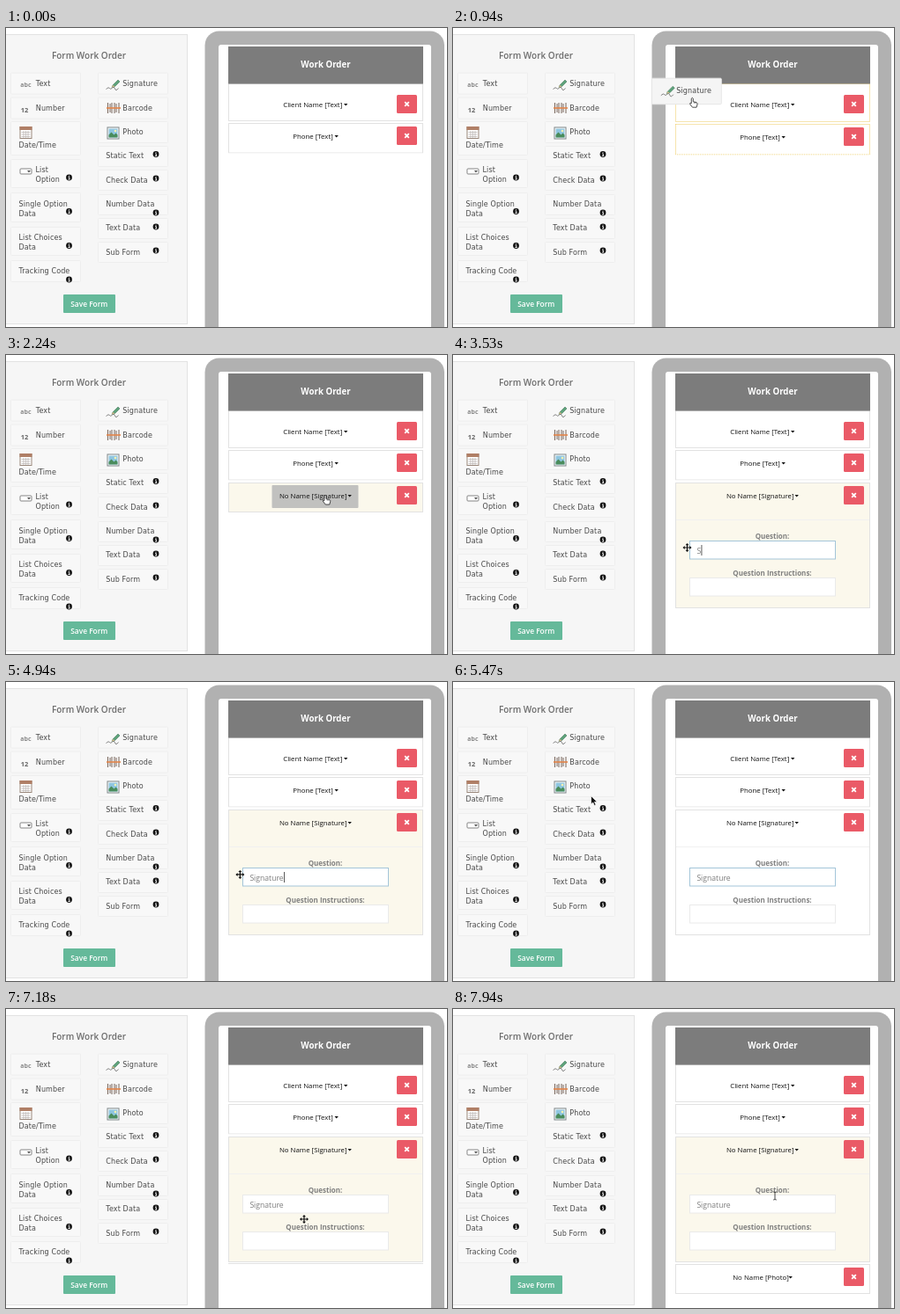
Recreate the animation shown at these times as an HTML page. Size 500 by 340 pixels, loop 8 s.

```html
<!DOCTYPE html>
<html lang="en">
<head>
<meta charset="utf-8">
<title>Form builder</title>
<style>
html, body { margin: 0; width: 100%; height: 100%; overflow: hidden; background: #fff; }
svg { display: block; }
text { font-family: "Open Sans", sans-serif; font-size: 7.85px; white-space: pre; }
.item { font-family: "DejaVu Sans", sans-serif; font-size: 8px; letter-spacing: .12px; fill: #484848; }
.box { fill: #f8f8f8; stroke: #eee; }
.label { font-weight: 700; font-size: 8px; fill: #808080; }
.value { font-size: 8.65px; fill: #7c7c7c; }
.mid { text-anchor: middle; }
.head { font-weight: 700; font-size: 9.7px; fill: #fff; }
</style>
</head>
<body>
<svg id="stage" width="500" height="340" viewBox="0 0 500 340"></svg>
<script>
const LOOP = 8000;
const stage = document.getElementById('stage');
const $ = id => document.getElementById(id);
const set = (id, attrs) => {
  for (const k in attrs) $(id).setAttribute(k, attrs[k]);
};
const show = (id, on) => set(id, { visibility: on ? 'visible' : 'hidden' });

const text = (x, y, s, cls = '', more = '') =>
  `<text x="${x}" y="${y}" class="${cls}" ${more}>${s}</text>`;
const rect = (x, y, w, h, fill, more = '') =>
  `<rect x="${x}" y="${y}" width="${w}" height="${h}" fill="${fill}" ${more}/>`;
const path = (d, fill = 'none', more = '') => `<path d="${d}" fill="${fill}" ${more}/>`;
const use = (id, x, y) => `<use href="#${id}" x="${x}" y="${y}"/>`;

const icons = {
  abc: text(0, 9, 'abc', '', 'font-weight="700" style="font-size:7px" fill="#8b8b8b"'),
  num: text(1, 9, '12', '', 'font-weight="700" style="font-size:7.5px" fill="#666"'),
  date: rect(.5, .5, 13, 13, '#fff', 'stroke="#99877b"') + rect(0, 0, 14, 4, '#b07f66') +
    path('M2 6.5H12M2 9H12M2 11.5H12M4.5 5V13M7 5V13M9.5 5V13', 'none', 'stroke="#b9b4b0" stroke-width=".7"'),
  list: rect(.5, .5, 13, 6, '#fff', 'rx="1" stroke="#858585"') + path('M8.5 2.5h4l-2 2.5z', '#555'),
  sign: path('M0 12.5q3-3 4-1t3-.5 3 1 4-.5', 'none', 'stroke="#666" stroke-width=".8"') +
    path('M7.5 8L13.5 2l2 2L10 9.5l-3.5 1z', '#5da37a', 'stroke="#3d6b53" stroke-width=".5"') +
    path('M7.5 8l2.5 1.5-3.5 1z', '#d9b98a'),
  bars: path('M1.5 0V12M4 1V11M6 0V12M9 0V12M11 1V11M14 0V12', 'none', 'stroke="#77655a" stroke-width="1"') +
    path('M0 6H16', 'none', 'stroke="#e58549" stroke-width="1.6"'),
  photo: rect(.5, .5, 13, 13, '#fff', 'stroke="#7d8588"') + rect(2, 2, 10, 10, '#8fc6e0') +
    path('M2 12V9l3-3 3 3 2-2 2 2v3z', '#4a8c5c') + '<circle cx="9.5" cy="4.5" r="1.3" fill="#fff3b0"/>',
  info: '<circle r="3.4" fill="#111"/>' + path('M-.9-.5H.3V2M-1.1 2H1.2M0-2.3V-1.3', 'none', 'stroke="#fff" stroke-width=".9"')
};

const pointers = {
  arrow: path('M0 0V9.5L2.2 7.5 3.8 11 5.5 10.2 4 6.9H7z', '#111', 'stroke="#fff" stroke-width=".7"'),
  hand: path('M-1 1Q0-.8 1 1V4.6L4.8 5.4Q6.1 6 5.7 7.8L4.8 11H.2L-2.8 7Q-2.8 5.5-1 6.5z', '#fff', 'stroke="#222" stroke-width=".8"') +
    path('M2.2 5V6.6M4 5.4V6.8', 'none', 'stroke="#222" stroke-width=".6"'),
  move: path('M-3.5 0H3.5M0-3.5V3.5', 'none', 'stroke="#111" stroke-width="1.2"') +
    path('M0-5l2 2.2h-4zM0 5l2-2.2h-4zM-5 0l2.2-2v4zM5 0l-2.2-2v4z', '#111'),
  beam: path('M-1.8-4.5Q0-4.5 0-3.5Q0-4.5 1.8-4.5M0-3.5V3.5M-1.8 4.5Q0 4.5 0 3.5Q0 4.5 1.8 4.5', 'none', 'stroke="#333" stroke-width=".9"')
};

// Palette entries: x, y, height, icon, icon offset, text offset, lines, info mark offset
const palette = [
  [5.5, 51, 24, 'abc', [10.8, 7], [28.3, 15], ['Text']],
  [5.5, 79, 24, 'num', [10.3, 8], [28.3, 14.5], ['Number']],
  [5.5, 106.5, 38, 'date', [10, 5.5], [9, 29.8], ['Date/Time']],
  [5.5, 149.5, 32, 'list', [10, 10], [28, 14], ['List', 'Option'], [66, 20.5]],
  [5.5, 187.5, 33, '', 0, [9, 15], ['Single Option', 'Data'], [66, 21]],
  [5.5, 226.5, 32, '', 0, [9, 14.8], ['List Choices', 'Data'], [66, 21]],
  [5.5, 264.5, 24, '', 0, [9, 14.8], ['Tracking Code'], [66, 21.5]],
  [104.5, 51, 24, 'sign', [9, 6], [27.8, 15], ['Signature']],
  [104.5, 79, 24, 'bars', [9.5, 6], [27.8, 14.5], ['Barcode']],
  [104.5, 106.5, 24, 'photo', [10, 6], [27.8, 14.5], ['Photo']],
  [104.5, 134.5, 23, '', 0, [8.8, 13.8], ['Static Text'], [65.5, 9]],
  [104.5, 161.5, 23, '', 0, [8.8, 14], ['Check Data'], [65.5, 9.5]],
  [104.5, 189.5, 23, '', 0, [8.8, 13.8], ['Number Data'], [65.5, 20.5]],
  [104.5, 216.5, 23, '', 0, [8.8, 13.8], ['Text Data'], [65.5, 9.5]],
  [104.5, 243.5, 23, '', 0, [8.8, 14], ['Sub Form'], [65.5, 9.5]]
].map(([x, y, h, icon, at, tx, lines, mark]) =>
  `<g transform="translate(${x} ${y})"><rect width="79" height="${h}" rx="1" class="box"/>` +
  (icon ? use(icon, ...at) : '') +
  lines.map((s, i) => text(tx[0], tx[1] + i * 11, s, 'item')).join('') +
  (mark ? use('info', ...mark) : '') + '</g>').join('');

// Form rows: top, height, content centre, label, label x, caret x
const rows = [
  [63, 43, 24, 'Client Name [Text]', 62.2, 131],
  [108, 34.5, 15, 'Phone [Text]', 73.2, 120.5],
  [145, 34, 15, 'No Name [Signature]', 57.9, 135.5],
  [290, 34, 15, 'No Name [Photo]', 65.2, 128.5]
];

const input = (id, y) => rect(16.5, y, 165, 20.5, '#fff', `id="${id}" stroke="#eaeaea"`);
const details = '<g id="details">' +
  path('M1 42.5H220', 'none', 'stroke="#f1f1f1"') +
  text(110, 63.8, 'Question:', 'label mid') + input('ask', 66.5) +
  rect(24, 70.5, 50, 12, '#b4d5fb', 'id="pick"') +
  text(24.4, 80.5, '', 'value', 'id="value"') +
  rect(0, 71, .8, 12, '#333', 'id="caret"') +
  text(110, 105.5, 'Question Instructions:', 'label mid') + input('notes', 108.5) + '</g>';

const rowMarkup = ([y, h, c, label, x, end], i) =>
  `<svg id="row${i}" x="252" y="${y}" width="221" height="${h}">` +
  rect(.5, .5, 220, h - 1, '#fff', `id="frame${i}"`) + `<g id="body${i}">` +
  (i === 2 ? rect(49.5, 3, 98, 26, '#c1c1bf', 'id="hot" rx="1"') : '') +
  text(x, c + 2.7, label, '', 'fill="#111"') +
  path(`M${end} ${c - .9}h4.4l-2.2 2.4z`, '#111') +
  rect(191, c - 11, 23, 21, '#ea5a67', 'rx="1.5"') +
  path(`M200.2 ${c - 2.8}l4.6 4.6m0-4.6l-4.6 4.6`, 'none', 'stroke="#fff" stroke-width="1.9"') +
  (i === 2 ? details : '') + '</g></svg>';

const group = set => Object.entries(set).map(([id, s]) => `<g id="${id}">${s}</g>`).join('');

stage.innerHTML = `<defs>${group(icons)}</defs>` +
  rect(0, 0, 500, 340, '#fff') +
  rect(-1.5, 7.5, 207, 329, '#f6f6f6', 'stroke="#e2e2e2"') +
  text(94, 34.5, 'Form Work Order', 'mid', 'fill="#6c6c6c" font-weight="600" style="font-size:10px"') +
  palette +
  rect(65, 303, 59, 21, '#65b99a', 'rx="1"') +
  text(94.3, 316.5, 'Save Form', 'mid', 'fill="#fff" font-weight="600" style="font-size:8.4px"') +
  rect(225.5, 3.5, 271.5, 380, '#b1b1b1', 'rx="16"') +
  rect(241, 19, 241, 380, '#fff', 'rx="3"') +
  rows.map(rowMarkup).join('') +
  rect(252, 21, 221, 42.5, '#7c7c7c') +
  text(362.5, 45.3, 'Work Order', 'head mid') +
  '<g id="ghost"><rect id="card" height="29.5" rx="1" fill="#f5f5f5" stroke="#e6e6e6"/>' +
  '<use id="cardIcon" x="10.5" y="7"/>' + text(28, 16.5, '', 'item', 'id="cardText"') + '</g>' +
  '<g id="pointer">' + group(pointers) + '</g>';

// Pointer route: time, x, y, shape from here on, 1 for an even pace to the next point
const route = [
  [0, 185, 246, ''],
  [240, 185, 246, 'arrow'],
  [460, 150, 74, 'hand'],
  [560, 150.5, 74, 'hand', 1],
  [1000, 290, 80, 'hand', 1],
  [1060, 298, 82, 'hand'],
  [1290, 312, 132, 'hand'],
  [1530, 312, 132, 'move'],
  [1640, 307, 115, 'move'],
  [1740, 307, 115, 'move', 1],
  [2090, 346, 148, 'hand', 1],
  [2210, 362, 159, 'hand'],
  [2460, 362, 159, 'hand', 1],
  [2560, 351, 175, 'move', 1],
  [2950, 305, 216, 'beam'],
  [3120, 298, 221, 'beam', 1],
  [3180, 281, 220, 'beam', 1],
  [3240, 265.5, 219, 'move'],
  [4940, 265.5, 219, 'move', 1],
  [5040, 252, 207, 'arrow', 1],
  [5470, 156.5, 129.5, 'arrow'],
  [5710, 154, 128, 'hand'],
  [5940, 150, 129, 'hand'],
  [6240, 150, 129, 'hand', 1],
  [6590, 269.5, 149.5, 'hand', 1],
  [7000, 338, 239, 'hand'],
  [7180, 338, 239, 'move'],
  [7640, 338, 239, 'move', 1],
  [7700, 343, 234, 'beam'],
  [7930, 365, 212.5, 'beam'],
  [LOOP, 365, 212.5, 'beam']
];
const drags = [
  { from: 560, to: 1530, icon: 'sign', name: 'Signature', w: 79 },
  { from: 6240, to: 7180, icon: 'photo', name: 'Photo', w: 61.5 }
];
const keys = [3530, 3760, 3820, 4000, 4120, 4290, 4410, 4590, 4760];
const word = 'Signature';

const ramp = (t, from, len) => {
  const p = Math.min(1, Math.max(0, (t - from) / len));
  return .5 - Math.cos(Math.PI * p) / 2;
};

function pointerAt(t) {
  let i = 0;
  while (i < route.length - 2 && route[i + 1][0] <= t) i++;
  const [t0, x0, y0, shape, even] = route[i], [t1, x1, y1] = route[i + 1];
  const p = even ? (t - t0) / (t1 - t0) : ramp(t, t0, t1 - t0);
  return { x: x0 + (x1 - x0) * p, y: y0 + (y1 - y0) * p, shape };
}

function drawRows(t, m, drag) {
  const grown = [1, 1, ramp(t, 1615, 200), ramp(t, 7160, 200)];
  const open = ramp(t, 2350, 400);
  const extra = drag ? 1 : 0;
  rows.forEach(([y, h], i) => {
    const full = i === 2 ? h + 109 * open : h;
    const top = y + i * extra - (1 - grown[i]), seen = (full + extra) * grown[i];
    const hover = !drag && m.shape && m.x > 252 && m.y >= top && m.y < top + seen;
    set('row' + i, { y: top, height: Math.max(.01, seen), visibility: grown[i] > 0 ? 'visible' : 'hidden' });
    set('frame' + i, {
      height: full + extra - 1,
      fill: hover ? '#fbf8ec' : '#fff',
      stroke: drag ? '#ecc95a' : '#e2e2e2',
      'stroke-dasharray': drag ? '1 1' : 'none'
    });
    set('body' + i, { transform: `translate(0 ${-3 * (1 - grown[i])})` });
  });
  set('details', { display: open > 0 ? 'inline' : 'none' });
  set('hot', { display: m.shape === 'hand' && !drag && m.x > 301 && m.y >= 148 && m.y < 174 ? 'inline' : 'none' });
}

function drawField(t) {
  const typed = keys.filter(k => k <= t).length;
  const focus = t >= 3120 && t < 5940;
  const value = $('value');
  value.textContent = typed ? word.slice(0, typed) : 'No Name';
  const blink = typed > 0 && focus && (t - keys[typed - 1]) % 1000 < 500;
  set('ask', { stroke: focus ? '#a3c5d9' : '#eaeaea' });
  set('pick', { display: t >= 3180 && !typed ? 'inline' : 'none' });
  set('caret', { display: blink ? 'inline' : 'none', x: 24.8 + (blink ? value.getComputedTextLength() : 0) });
}

function draw(t) {
  const m = pointerAt(t);
  const drag = drags.find(d => t >= d.from && t < d.to);
  drawRows(t, m, drag);
  drawField(t);
  show('ghost', drag);
  if (drag) {
    set('ghost', { transform: `translate(${m.x - 46} ${m.y - 22})` });
    set('card', { width: drag.w });
    set('cardIcon', { href: '#' + drag.icon });
    $('cardText').textContent = drag.name;
  }
  set('pointer', { transform: `translate(${m.x} ${m.y})` });
  for (const id in pointers) show(id, id === m.shape);
}

const start = performance.now();
function tick() {
  draw((performance.now() - start) % LOOP);
  requestAnimationFrame(tick);
}
tick();
</script>
</body>
</html>
```
